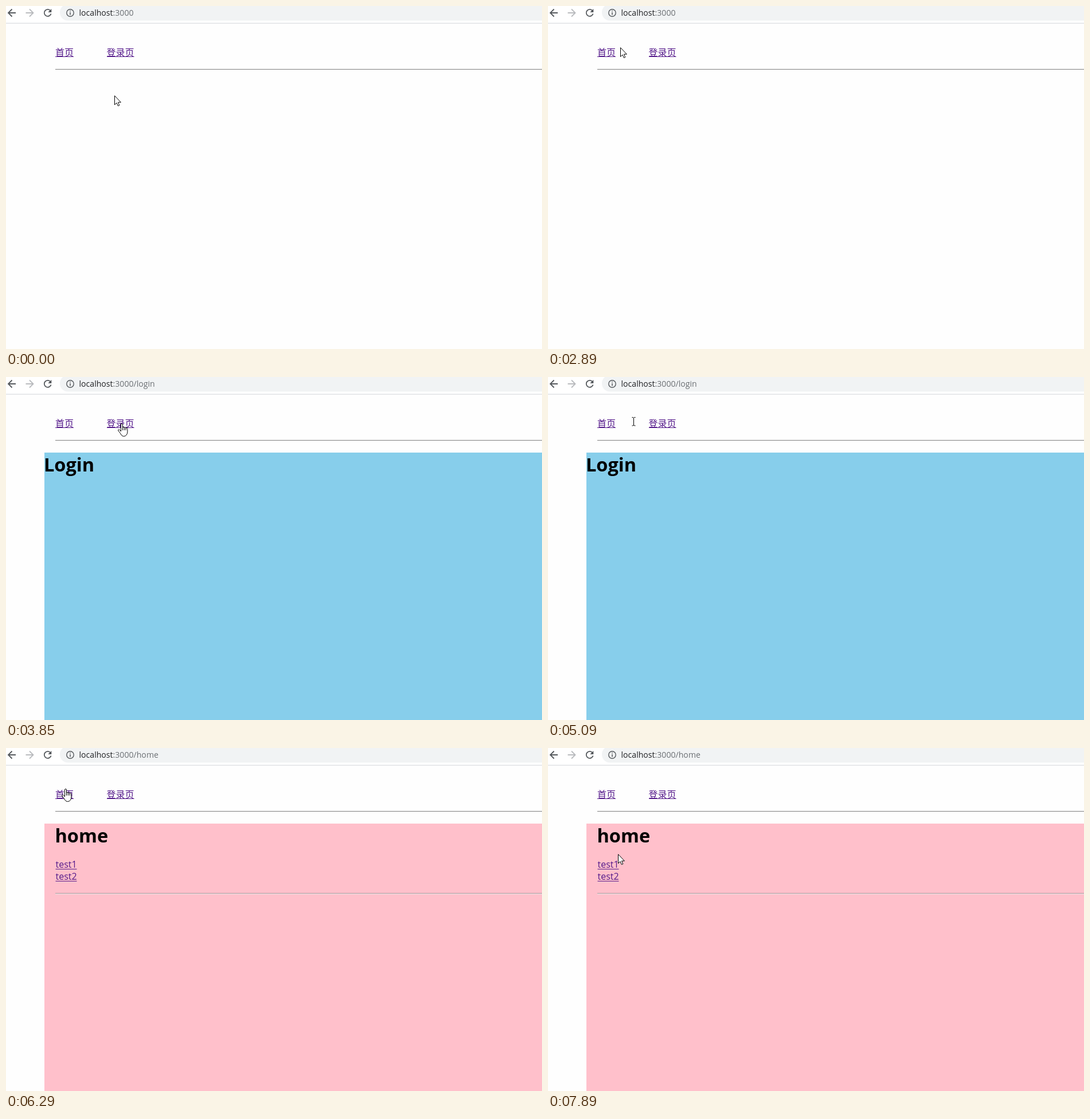
An HTML page that plays this animation: 935x599 px, repeating every 8 s.

```html
<!DOCTYPE html>
<html lang="zh">
<head>
<meta charset="utf-8">
<style>
  html, body { margin: 0; width: 100%; height: 100%; overflow: hidden; background: #fefefe; }
  svg { display: block; }
  text { font: 16px "Open Sans", "Noto Sans", sans-serif; white-space: pre; }
  .url { font-size: 14.1px; fill: #202124; }
  .path { fill: #6b6f73; }
  .title { font-size: 32.5px; font-weight: 700; }
  .link { fill: #551a8b; }
  .link text { font-family: "Noto Sans CJK SC", "Noto Sans CJK", "Open Sans", sans-serif; }
  .link .latin { font-family: "Open Sans", "Noto Sans", sans-serif; }
  .active { fill: #f00; }
  .icon { fill: none; stroke: #54585c; stroke-width: 1.8; }
  .pointer { fill: #fff; stroke: #000; }
</style>
</head>
<body>
<svg width="935" height="599" viewBox="0 0 935 599">
  <defs>
    <g id="rule">
      <rect width="849" height="1" fill="#8a8a8a"/>
      <rect y="1" width="849" height="1" fill="#eee"/>
    </g>
    <path id="back" d="M17 12H4M10.5 5.5L4 12L10.5 18.5"/>
  </defs>

  <rect width="935" height="30" fill="#fff"/>
  <rect y="29.5" width="935" height="1.2" fill="#dadce0"/>
  <rect x="94" y="-3" width="870" height="28.5" rx="14" fill="#f1f3f4"/>
  <g class="icon">
    <use href="#back"/>
    <use href="#back" transform="matrix(-1 0 0 1 51.5 0)" stroke="#b9bbbe"/>
    <path d="M77.5 8.2A6 6 0 1 0 78.6 13.5"/>
    <path d="M79.3 5V11H73.3Z" fill="#54585c" stroke="none"/>
    <circle cx="112" cy="12" r="6.2" stroke-width="1.4"/>
    <path d="M112 11V15.5M112 8V9.6" stroke-width="1.5"/>
  </g>
  <text class="url" x="127.5" y="17">localhost<tspan class="path" id="path"></tspan></text>

  <g class="link" id="homeLink">
    <text x="86" y="87">首页</text>
    <rect x="86" y="88" width="32" height="1"/>
  </g>
  <g class="link">
    <text x="175.5" y="87">登录页</text>
    <rect x="176" y="88" width="47.5" height="1"/>
  </g>
  <use href="#rule" x="86" y="110"/>

  <g id="login">
    <rect x="67" y="132" width="868" height="467" fill="skyblue"/>
    <text class="title" x="66" y="165">Login</text>
  </g>
  <g id="home">
    <rect x="67" y="132" width="868" height="467" fill="pink"/>
    <text class="title" x="85.5" y="165">home</text>
    <g class="link">
      <text class="latin" x="86.5" y="209">test1</text>
      <rect x="86.5" y="211" width="37" height="1"/>
      <text class="latin" x="86.5" y="230">test2</text>
      <rect x="86.5" y="232" width="37" height="1"/>
    </g>
    <use href="#rule" x="86" y="253.5"/>
  </g>

  <g id="cursor">
    <circle id="ring" cx="7" cy="1" r="9.8" fill="none" stroke="#000"/>
    <path id="arrow" class="pointer" d="M.5 .7V16.5L4 13.2L6.4 18.5L8.8 17.5L6.5 12.2H11.4Z"/>
    <path id="beam" fill="none" stroke="#000" d="M.5 .5H2.5L3.5 1.5L4.5 .5H6.5M3.5 1V14.5M.5 15H2.5L3.5 14L4.5 15H6.5"/>
    <g id="hand" class="pointer">
      <path d="M5.5 14V2Q5.5 .5 7 .5T8.5 2V8Q8.5 6.3 9.9 6.3T11.3 8Q11.4 6.9 12.7 6.9T14 8.6Q14.3 7.8 15.4 7.8T16.9 9.6V15Q16.9 18 15 20.3Q13.6 22.5 10.5 22.5Q7.5 22.5 6 20Q4.5 17.5 3.5 16L1 13Q0 11 1.6 10.7Q3.3 10.5 5.5 14Z"/>
      <path d="M8.5 8V12M11.3 8V12M14 8.6V12"/>
    </g>
  </g>
</svg>
<script>
const LOOP = 8000;
const el = id => document.getElementById(id);
const show = (id, on) => el(id).style.display = on ? '' : 'none';

// start time, pointer shape, left, top
const moves = [
  [0, 'arrow', 189, 156], [150, 'arrow', 166, 113], [300, 'beam', 147, 81],
  [450, 'arrow', 138, 72], [570, 'arrow', 131, 66], [690, 'arrow', 125, 62],
  [840, 'arrow', 116, 64], [970, 'arrow', 109, 66],
  [1120, 'hand', 98, 74], [1250, 'hand', 95, 80],
  [2890, 'arrow', 126, 72], [3010, 'hand', 172, 74], [3130, 'hand', 192, 81], [3280, 'hand', 195, 81],
  [4820, 'hand', 190, 81], [4970, 'hand', 174, 75], [5090, 'beam', 146, 70],
  [5240, 'arrow', 123, 74], [5390, 'hand', 103, 71], [5510, 'hand', 97, 71],
  [7260, 'arrow', 119, 82], [7380, 'arrow', 126, 102], [7500, 'arrow', 130, 124],
  [7620, 'beam', 132, 146], [7770, 'arrow', 126, 168], [7890, 'arrow', 122, 185]
];

function draw() {
  const t = performance.now() % LOOP;
  const within = (from, to) => t >= from && t < to;
  const page = t < 3850 ? '' : t < 6290 ? 'login' : 'home';
  const [, shape, x, y] = moves.findLast(move => move[0] <= t);

  el('path').textContent = ':3000' + (page && '/' + page);
  for (const id of ['login', 'home']) show(id, id === page);
  for (const id of ['arrow', 'beam', 'hand']) show(id, id === shape);
  show('ring', within(3710, 3850) || within(6170, 6290));
  el('homeLink').classList.toggle('active', within(6170, 6290));
  el('cursor').setAttribute('transform', `translate(${x} ${y})`);
  requestAnimationFrame(draw);
}
draw();
</script>
</body>
</html>
```
